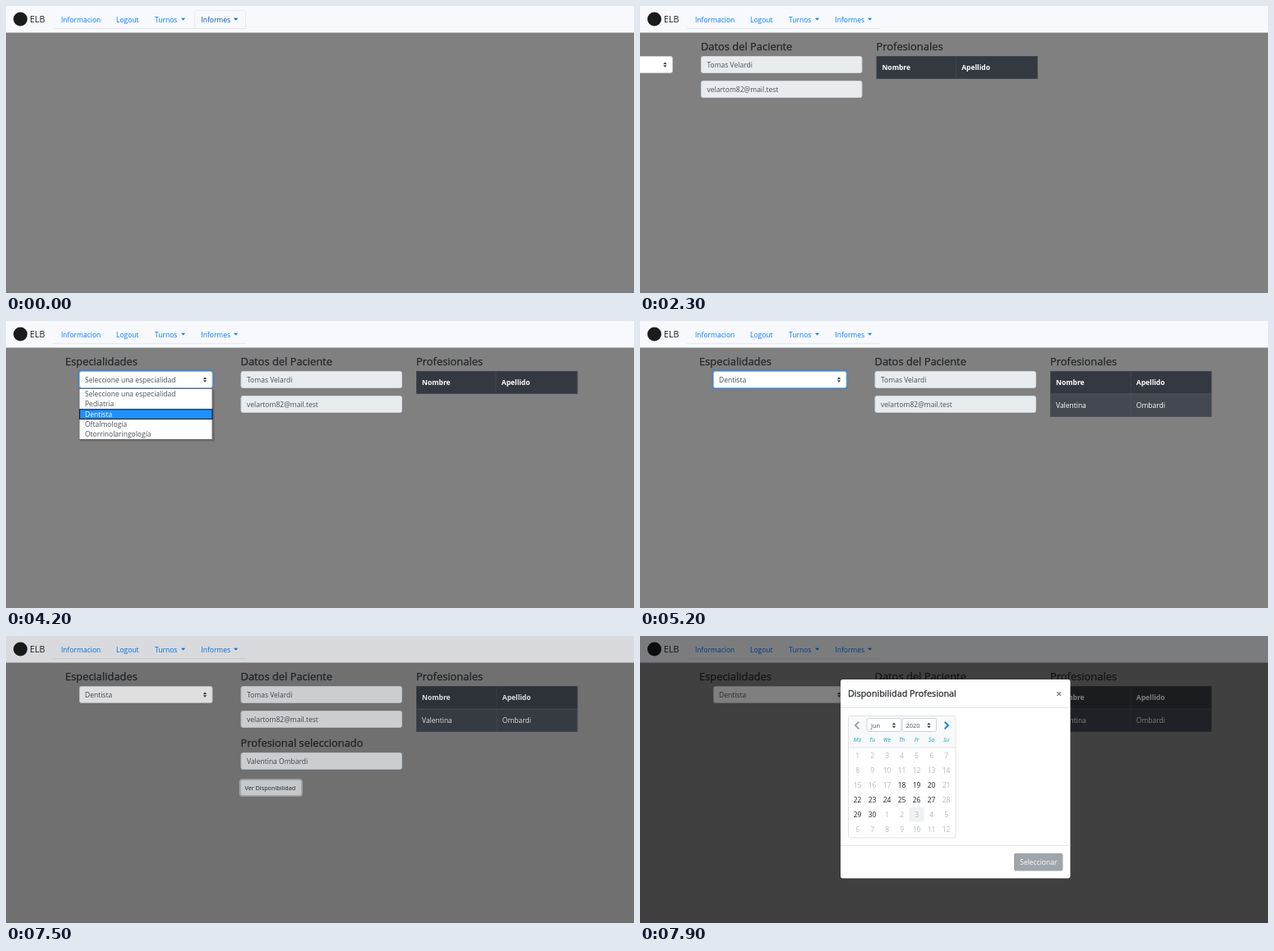
Write an HTML page that moves like this. It is 764 px wide and 350 px high and loops after 8000 ms.

```html
<!DOCTYPE html>
<html lang="es">
<head>
<meta charset="utf-8">
<title>Turnos</title>
<style>
  html, body { margin: 0; width: 100%; height: 100%; overflow: hidden; background: #808080; }
  svg { display: block; width: 764px; height: 350px; overflow: hidden; }
  text { font-family: "Open Sans", "Noto Sans", sans-serif; white-space: pre; }
</style>
</head>
<body>
<svg id="stage" viewBox="0 0 764 350"></svg>
<script>
const LOOP = 8000, STEP = 100;
const INK = '#212529', GREY = '#495057', LINK = '#007bff';

// Drawing helpers
const text = (x, y, str, fill = INK, size = 8.5, more = '') =>
  `<text x="${x}" y="${y}" font-size="${size}" fill="${fill}" ${more}>${str}</text>`;
const rect = (x, y, w, h, fill, more = '') =>
  `<rect x="${x}" y="${y}" width="${w}" height="${h}" fill="${fill}" ${more}/>`;
const path = (d, fill, more = '') => `<path d="${d}" fill="${fill}" ${more}/>`;
const line = (x1, y1, x2, y2, stroke) => path(`M${x1} ${y1}L${x2} ${y2}`, 'none', `stroke="${stroke}"`);
const box = (x, y, w, h, fill, stroke, r = 2.2) =>
  rect(x + .5, y + .5, w - 1, h - 1, fill, `stroke="${stroke}" rx="${r}"`);
const heading = (x, y, str, size = 12.9) =>
  text(x, y, str, INK, size, `stroke="${INK}" stroke-width=".25"`);
const ring = (x, y, w, h, color) =>
  rect(x - .9, y - .9, w + 1.8, h + 1.8, 'none', `stroke="${color}" stroke-width="1.8" rx="3"`);
const caret = (x, fill) => path(`M${x} 14.7h5.2l-2.6 2.7z`, fill);
const arrows = (x, y) => path(`M${x - 2.2} ${y - .7}h4.4l-2.2 -2.5zM${x - 2.2} ${y + .7}h4.4l-2.2 2.5z`, '#343a40');
const during = (from, to, body) => `<g data-from="${from}" data-to="${to}">${body}</g>`;

// Navigation
const tab = (x, w, fill, stroke) =>
  path(`M${x} 27.5V7.5q0 -2 2 -2h${w - 4}q2 0 2 2V27.5`, fill, `stroke="${stroke}"`);
const menu = (x, label, caretX, fill) => text(x, 19.7, label, fill) + caret(caretX, fill);
const turnos = fill => menu(181, 'Turnos', 213, fill);
const informes = fill => menu(237.3, 'Informes', 277, fill);

const nav = rect(0, 0, 764, 32.5, '#f7f9fd') +
  '<circle cx="17.5" cy="16" r="8.5" fill="#1b1b1b"/>' +
  text(29, 20.2, 'ELB', INK, 10.7) +
  line(57, 27.5, 292, 27.5, '#e6eaf0') +
  text(67, 19.7, 'Informacion', LINK) +
  text(134, 19.7, 'Logout', LINK) +
  during(0, 400, tab(229.5, 62, 'none', '#e9ecf1') + informes('#0056b3')) +
  during(400, LOOP, informes(LINK)) +
  during(0, 500, turnos(LINK)) +
  during(500, 800, tab(171.5, 56, 'none', '#e9ecf1') + turnos('#0056b3')) +
  during(800, 1900, tab(171.5, 56, '#fff', '#dee2e6') + turnos(GREY)) +
  during(1900, LOOP, turnos(LINK));

const firstItem = (bg, fill) => rect(172, 32.5, 88.7, 18, bg) + text(185.5, 44.9, 'Solicitar Turno', fill);
const dropdown = during(800, 1900,
  box(171.5, 27.5, 89.5, 45.5, '#fff', '#d5d7d9') +
  during(800, 1300, firstItem('#fff', INK)) +
  during(1300, 1600, firstItem('#f1f3f5', INK)) +
  during(1600, 1700, firstItem(LINK, '#fff')) +
  during(1700, 1900, firstItem('#f1f3f5', INK)) +
  text(185.5, 62.9, 'Ver Turnos'));

const statusBar = (w, url) =>
  path(`M0 338.5H${w - 2}q2 0 2 2V350H0z`, '#000') + text(3, 346.8, url, '#fff', 6.3);
const status =
  during(800, 1300, statusBar(55, 'localhost:4200/#')) +
  during(1300, 2200, statusBar(83, 'localhost:4200/altaTurnos'));

// Speciality select
const options = ['Seleccione una especialidad', 'Pediatria', 'Dentista', 'Oftalmologia', 'Otorrinolaringología'];
const optionY = i => 83 + i * 12.35;
const marked = (i, from, to) => during(from, to,
  rect(89.6, optionY(i) + .1, 161.4, 11.8, '#1e90ff', 'stroke="#0b1a2c" stroke-width="1.1"') +
  text(96, optionY(i) + 9, options[i], '#fff'));

const select =
  during(0, 3400, box(89, 61, 162.5, 21, '#fff', '#ced4da')) +
  during(3400, 5500, ring(89, 61, 162.5, 21, 'rgba(0,123,255,.25)') + box(89, 61, 162.5, 21, '#fff', '#80bdff')) +
  during(5500, LOOP, box(89, 61, 162.5, 21, '#fff', '#ced4da')) +
  during(0, 4400, text(96, 74.8, options[0], GREY)) +
  during(4400, LOOP, text(96, 74.8, options[2], GREY)) +
  arrows(242, 71.6);
const list = during(3500, 4400,
  rect(90, 84, 163.5, 62.5, 'rgba(0,0,0,.18)') +
  box(88.5, 82, 163, 63, '#fff', '#6d6d6d', 0) +
  options.map((o, i) => text(96, optionY(i) + 9, o, GREY)).join('') +
  marked(0, 3500, 4000) + marked(1, 4000, 4200) + marked(2, 4200, 4400));

// Patient form
const field = (y, str) => box(285.5, y, 196.5, 21, '#e9ecef', '#ced4da') + text(293, y + 14, str, GREY);
const button = fill => rect(285.5, 176, 73.5, 18, fill, 'rx="1.8"');
const chosen = during(5500, LOOP,
  heading(285.5, 134.5, 'Profesional seleccionado') +
  field(142, 'Valentina Ombardi') +
  during(5500, 7200, button('#f8f9fa')) +
  during(7200, 7300, button('#e2e6ea')) +
  during(7300, LOOP, ring(285.5, 176, 73.5, 18, 'rgba(248,249,250,.5)') + button('#e2e6ea')) +
  text(290.5, 187.8, 'Ver Disponibilidad', INK, 7.25));

// Professionals table
const cells = (y, x, names, fill, more) =>
  text(506, y, names[0], fill, 8.5, more) + text(x, y, names[1], fill, 8.5, more);
const headRow = split => box(499, 61, 196.5, 28, '#343841', '#42474f', 0) +
  line(split, 61, split, 89, '#42474f') +
  cells(78, split + 6.8, ['Nombre', 'Apellido'], '#fff', 'font-weight="700"');
const bodyRow = fill => box(499, 89, 196.5, 28, fill, '#4a4f58', 0);
const table =
  during(0, 4400, headRow(596)) +
  during(4400, LOOP,
    headRow(597) +
    during(4400, 5100, bodyRow('#3e434c')) +
    during(5100, 6300, bodyRow('#444951')) +
    during(6300, LOOP, bodyRow('#3e434c')) +
    line(597, 89, 597, 117, '#4a4f58') +
    cells(106, 603.8, ['Valentina', 'Ombardi'], '#fff'));

const content = `<g id="content">` +
  heading(72, 53.7, 'Especialidades') + select + list +
  heading(285.5, 53.7, 'Datos del Paciente') +
  field(61, 'Tomas Velardi') + field(91, 'velartom82@mail.test') + chosen +
  heading(499, 53.7, 'Profesionales') + table + '</g>';

// Availability dialog
const middle = 'text-anchor="middle"';
const dayX = i => 264.6 + i % 7 * 18;
const weekdays = ['Mo', 'Tu', 'We', 'Th', 'Fr', 'Sa', 'Su']
  .map((d, i) => text(dayX(i), 129.4, d, '#17a2b8', 6.8, middle + ' font-style="italic"')).join('');
const days = Array.from({ length: 42 }, (_, i) => {
  const open = i >= 17 && i < 30 && i % 7 < 6;
  return text(dayX(i), 148.5 + Math.floor(i / 7) * 18, i < 30 ? i + 1 : i - 29, open ? INK : '#b6babe', 8.5, middle);
}).join('');
const chevron = (x, dx, color) => path(`M${x} 104.6l${dx} 4.4l${-dx} 4.4`, 'none', `stroke="${color}" stroke-width="1.9"`);
const picker = box(253, 97, 131.5, 149.5, '#fff', '#dfe1e4') +
  rect(254, 98, 129.5, 38, '#f7f9fb') + line(254, 136, 383.5, 136, '#e3e6e9') +
  chevron(266.3, -4.4, '#98a0a6') + chevron(370.6, 4.4, '#0a86d8') +
  box(275.5, 100, 43, 17, '#fff', '#ced4da') + text(281, 111.7, 'Jun', GREY, 7.4) + arrows(309, 109) +
  box(318.5, 100, 42.5, 17, '#fff', '#ced4da') + text(323.5, 111.7, '2020', GREY, 7.4) + arrows(351.5, 109) +
  weekdays + rect(327.6, 208.5, 18, 18, '#f0f1f2', 'rx="2"') + days;

const dialog = `<rect id="shade" width="764" height="350"/><g id="dialog">` +
  rect(243.5, 52.5, 280.5, 243.5, 'rgba(0,0,0,.2)', 'rx="3"') +
  rect(244, 53, 279.5, 242.5, '#fff', 'rx="2.7"') +
  heading(253, 74.2, 'Disponibilidad Profesional', 10.8) +
  text(509.7, 74.9, '×', '#7f7f7f', 13, middle + ' font-weight="700"') +
  line(244, 87.5, 523.5, 87.5, '#e3e6e9') + picker +
  line(244, 255.5, 523.5, 255.5, '#e3e6e9') +
  rect(455, 265, 59.5, 21.5, '#9fa5aa', 'rx="2.2"') +
  text(484.8, 278.8, 'Seleccionar', '#fff', 8.5, middle) + '</g>';

const stage = document.getElementById('stage');
stage.innerHTML = rect(0, 0, 764, 350, '#808080') + content + nav + dropdown + status + dialog;

// Playback
const $ = id => document.getElementById(id);
const timed = [...stage.querySelectorAll('[data-from]')]
  .map(el => ({ el, from: +el.dataset.from, to: +el.dataset.to }));
const clamp = v => Math.min(1, Math.max(0, v));
const slide = $('content').animate(
  [{ transform: 'translateX(-764px)' }, { transform: 'translateX(0)' }],
  { duration: 1000, delay: 1870, easing: 'ease', fill: 'both' });
slide.pause();

function draw(t) {
  for (const { el, from, to } of timed) el.style.display = t >= from && t < to ? '' : 'none';
  slide.currentTime = t;
  $('shade').setAttribute('opacity', .5 * clamp((t - 7450) / 197));
  const p = clamp((t - 7700) / 200);
  $('dialog').setAttribute('opacity', p);
  $('dialog').setAttribute('transform', `translate(0 ${-28 * (1 - p) ** 2})`);
}

const start = performance.now();
function tick() {
  const t = (performance.now() - start) % LOOP;
  draw(Math.floor(t / STEP) * STEP);
  requestAnimationFrame(tick);
}
tick();
</script>
</body>
</html>
```
